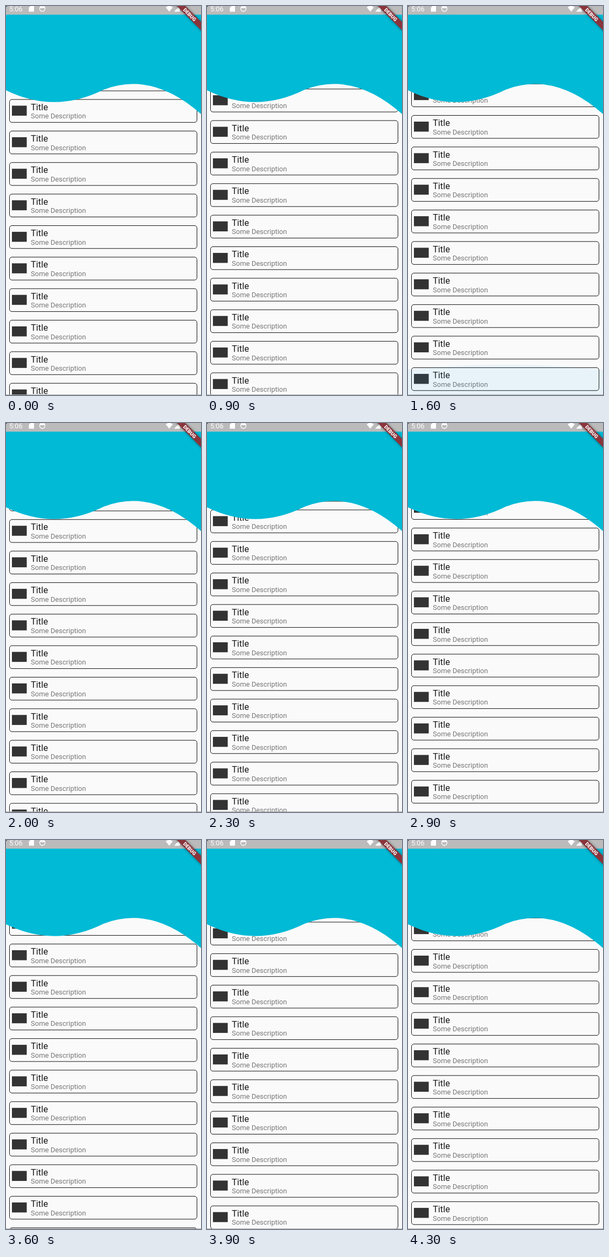
Animation, 362 px wide and 720 px high, one loop 5.9 s. Source, as an HTML page:

```html
<!DOCTYPE html>
<html lang="en">
<head>
<meta charset="utf-8">
<title>List under a wave header</title>
<style>
  html, body { margin: 0; width: 100%; height: 100%; overflow: hidden; background: #fafafa; }
  svg { display: block; width: 362px; height: 720px; font-family: Roboto, sans-serif; }
  .card { fill: none; stroke: #111; }
  .thumb { fill: #333; }
  .title { font-size: 16.5px; fill: #1a1a1a; }
  .desc { font-size: 13px; fill: #777; }
  .glow { fill: #2196f3; fill-opacity: .08; animation: glow 5.9s step-end infinite; }
  @keyframes glow {
    0% { visibility: hidden; }
    27.1186% { visibility: visible; }
    30.5085%, 100% { visibility: hidden; }
  }
</style>
</head>
<body>
<svg viewBox="0 0 362 720">
  <defs>
    <g id="row">
      <rect class="card" x="6.5" y=".5" width="348" height="42.4" rx="4.5"/>
      <rect class="thumb" x="11" y="12" width="27.5" height="18.5"/>
      <text class="title" x="46" y="20.2">Title</text>
      <text class="desc" x="46" y="35.7">Some Description</text>
    </g>
    <filter id="soft" x="-20%" y="-100%" width="140%" height="300%">
      <feGaussianBlur stdDeviation="2.5"/>
    </filter>
  </defs>

  <rect width="362" height="720" fill="#fafafa"/>
  <g id="list"></g>
  <path class="glow" d="M0 673Q181 655 362 673V720H0Z"/>
  <rect y="719" width="362" height="1" fill="#aaa"/>

  <path fill="#00bad6" d="M0 0V156Q90.5 200 181 155Q271.5 120 362 200V0Z"/>

  <g fill="#fff">
    <rect width="362" height="16" fill="#bbb"/>
    <text x="6" y="10" font-size="12.8">5:06</text>
    <path d="M45.5 0H52V10.5H42.5V3Z"/>
    <circle cx="67.5" cy="5" r="5" fill="none" stroke="#fff" stroke-width="1.3"/>
    <path d="M63 1.5H72V4H63Z"/>
    <path d="M296.500 2.500Q303 -3 309.500 2.500L303 10.500Z"/>
    <path d="M312 10.500L323 -.5V10.500Z"/>
  </g>

  <g transform="translate(341 16) rotate(45)">
    <rect x="-40" y="-5.500" width="80" height="11" opacity=".5" filter="url(#soft)"/>
    <rect x="-40" y="-5.500" width="80" height="11" fill="#8a343b"/>
    <text y="3.300" font-size="9.300" font-weight="900" fill="#fff" text-anchor="middle">DEBUG</text>
  </g>
  <path d="M0 0H3Q0 0 0 3Z"/>
</svg>
<script>
  const LOOP = 5900, TICK = 100, PITCH = 58.36, LAST_TOP = 668.9, ROWS = 13;
  const list = document.getElementById('list');

  // Drag path: [ms, distance from the list end, px per tick]
  const drag = [
    [900, 67.9, -17], [1400, 0, -5],
    [1700, 0, 5], [2300, 75.1, 9], [2900, 108.6, .8], [3100, 109.5, 0],
    [3300, 109.5, 0], [3600, 106.7, -3], [4300, 0, -6]
  ];
  const START = 87.2;

  for (let i = 0; i < ROWS; i++) {
    const row = document.createElementNS('http://www.w3.org/2000/svg', 'use');
    row.setAttribute('href', '#row');
    row.setAttribute('y', LAST_TOP - i * PITCH);
    list.append(row);
  }

  function hermite([t0, y0, v0], [t1, y1, v1], t) {
    const span = (t1 - t0) / TICK, u = (t - t0) / (t1 - t0), w = 1 - u;
    return w * w * ((1 + 2 * u) * y0 + u * span * v0)
         + u * u * ((1 + 2 * w) * y1 - w * span * v1);
  }

  function offset(t) {
    if (t < drag[0][0]) return START;
    const next = drag.findIndex(knot => knot[0] > t);
    if (next < 0) return 0;
    if (drag[next - 1][1] === drag[next][1]) return drag[next][1];
    return hermite(drag[next - 1], drag[next], t);
  }

  function draw() {
    const clock = document.timeline.currentTime ?? performance.now();
    const t = Math.floor(clock % LOOP / TICK) * TICK;
    list.setAttribute('transform', `translate(0 ${offset(t).toFixed(2)})`);
    requestAnimationFrame(draw);
  }
  draw();
</script>
</body>
</html>
```
